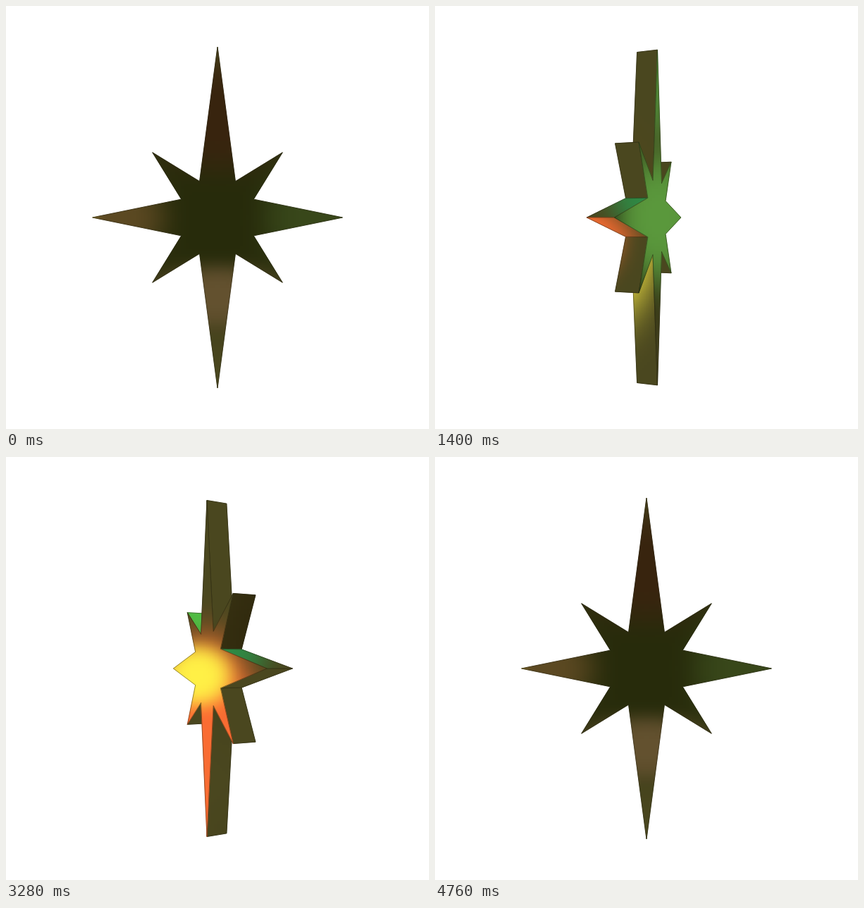
Write an HTML page with a canvas that moves like this. It is 600x600 px and loops after 4800 ms.

```html
<!DOCTYPE html>
<html>
<head>
<meta charset="utf-8">
<title>Turning star</title>
<style>
html, body { margin: 0; width: 100%; height: 100%; overflow: hidden; background: #fff; }
canvas { display: block; width: 100vw; height: 100vh; }
</style>
</head>
<body>
<canvas id="stage" width="600" height="600"></canvas>
<script>
const ctx = document.getElementById('stage').getContext('2d');
const buf = document.createElement('canvas');
const bctx = buf.getContext('2d', { willReadFrequently: true });
const STEP = 40, FRAMES = 120, CAM = 575, CELL = 4;
const FRONT = 14, BACK = -16;

// Half of the outline, clockwise with y up; the other half is its negative.
const half = [[0, 236], [24.8, 50], [90, 90], [50, 25.2], [173, 0], [50, -25.2], [90, -90], [24.8, -50]];
const outline = half.concat(half.map(([x, y]) => [-x, -y]));

const YELLOW = '#fff046', ORANGE = '#fa6c32', OLIVE = '#4a471f';

// Surroundings mirrored by the metal: azimuth, elevation, two radii (degrees), colour.
const lights = [
  [-95, -3, 46, 20, '#191707'],
  [-134, -1, 14, 22, '#141b09'],
  [-75, -46, 22, 16, '#30290d'],
  [0, 0, 20, 13, '#272b0b'],
  [-14, 0, 7, 8, '#38471a'],
  [15, 0, 7, 6, '#5c4922'],
  [0, 14, 9, 7, '#38240e'],
  [0, -11, 9, 4, '#63512f'],
  [46, 10, 14, 15, '#5c4517'],
  [56, 0, 4, 6, '#86661e'],
  [66, -48, 12, 9, '#6a5020'],
  [110, -20, 12, 16, '#7a6030'],
  [36, 1, 11, 6, ORANGE],
  [32, 9, 6, 5, ORANGE],
  [47, -8, 5, 6, '#e85c2e'],
  [50, -24, 6, 14, ORANGE],
  [38, -14, 7, 13, YELLOW],
  [37, -1, 4.5, 4.5, YELLOW],
  [31, -8, 5, 6, YELLOW],
  [22, 0, 4, 5, YELLOW],
  [51, -31, 5, 3, '#ffc038'],
  [61, 52, 10, 6, ORANGE],
  [66, 47, 4, 2, '#d8a030'],
  [129, -12, 11, 7, ORANGE],
  [138, -6, 7, 10, ORANGE],
  [137, -20, 6, 9, ORANGE],
  [128, -17, 4, 7, YELLOW],
  [139, -1, 4.5, 4, YELLOW],
  [110, 19, 6, 3, '#d09a22'],
  [110, -14, 8, 4, ORANGE],
  [113, -29, 12, 5, ORANGE],
  [120, -22, 6, 6, ORANGE],
  [121, 28, 5, 4, ORANGE],
  [121, 21, 6, 4, YELLOW],
  [172, 33, 8, 5, '#48b050'],
  [172, -33, 9, 6, ORANGE],
  [168, -18, 9, 5, ORANGE],
  [-147, 19, 8, 8, '#4f8636'],
  [-150, 0, 6, 9, '#5a983c'],
  [-171, 50, 10, 4, '#50bc44'],
  [-179, 19, 7, 6, '#2f8a45']
].map(([az, el, ra, re, hex]) => ({ az, el, ra, re, rgb: rgb(hex) }));
const base = rgb(OLIVE);

function rgb(hex) {
  const n = parseInt(hex.slice(1), 16);
  return [n >> 16, n >> 8 & 255, n & 255];
}

const dot = (a, b) => a[0] * b[0] + a[1] * b[1] + a[2] * b[2];

function turn([x, y, z], a) {
  const c = Math.cos(a), s = Math.sin(a);
  return [x * c - z * s, y, x * s + z * c];
}

function project([x, y, z]) {
  const k = CAM / (CAM - z);
  return [300 + x * k, 300 - y * k];
}

// Colour of the surroundings in direction r, written to d at index i.
function sky(r, d, i) {
  const deg = 180 / Math.PI;
  const az = Math.atan2(-r[0], r[2]) * deg;
  const el = Math.asin(Math.max(-1, Math.min(1, r[1]))) * deg;
  let [R, G, B] = base;
  for (const l of lights) {
    let da = Math.abs(az - l.az);
    if (da > 180) da = 360 - da;
    const u = da / l.ra, v = (el - l.el) / l.re, q = u * u + v * v;
    if (q > 4) continue;
    const a = Math.exp(-0.7 * q * q);
    R += (l.rgb[0] - R) * a;
    G += (l.rgb[1] - G) * a;
    B += (l.rgb[2] - B) * a;
  }
  d[i] = R; d[i + 1] = G; d[i + 2] = B; d[i + 3] = 255;
}

// Coarse mirror image for one flat face, scaled up smoothly as a fill.
function mirror(pts, n) {
  const xs = pts.map(p => p[0]), ys = pts.map(p => p[1]);
  const x0 = Math.floor(Math.min(...xs)) - 2 * CELL, y0 = Math.floor(Math.min(...ys)) - 2 * CELL;
  const w = Math.ceil((Math.max(...xs) - x0) / CELL) + 2;
  const h = Math.ceil((Math.max(...ys) - y0) / CELL) + 2;
  const img = bctx.createImageData(w, h);
  for (let j = 0; j < h; j++) {
    for (let i = 0; i < w; i++) {
      const x = x0 + (i + 0.5) * CELL - 300, y = 300 - y0 - (j + 0.5) * CELL;
      const m = Math.hypot(x, y, CAM), v = [x / m, y / m, -CAM / m];
      const k = 2 * dot(v, n);
      sky([v[0] - k * n[0], v[1] - k * n[1], v[2] - k * n[2]], img.data, (j * w + i) * 4);
    }
  }
  buf.width = w;
  buf.height = h;
  bctx.putImageData(img, 0, 0);
  const fill = ctx.createPattern(buf, 'repeat');
  fill.setTransform(new DOMMatrix([CELL, 0, 0, CELL, x0, y0]));
  return fill;
}

function makeFaces() {
  const cap = (z, dir) => ({ n: [0, 0, dir], cap: true, pts: outline.map(([x, y]) => [x, y, z]) });
  const walls = outline.map(([x, y], i) => {
    const [u, v] = outline[(i + 1) % outline.length];
    const len = Math.hypot(u - x, v - y);
    return {
      n: [(y - v) / len, (u - x) / len, 0],
      pts: [[x, y, FRONT], [u, v, FRONT], [u, v, BACK], [x, y, BACK]]
    };
  });
  return [...walls, cap(FRONT, 1), cap(BACK, -1)];
}
const faces = makeFaces();

function paint(face) {
  const pts = face.pts.map(project);
  ctx.beginPath();
  pts.forEach(([x, y]) => ctx.lineTo(x, y));
  ctx.closePath();
  ctx.fillStyle = mirror(pts, face.n);
  ctx.fill();
  ctx.strokeStyle = ctx.fillStyle;
  ctx.stroke();
  ctx.strokeStyle = 'rgba(32,30,12,0.5)';
  ctx.stroke();
}

function draw(angle) {
  ctx.fillStyle = '#fff';
  ctx.fillRect(0, 0, 600, 600);
  ctx.lineWidth = 0.9;
  ctx.lineJoin = 'bevel';
  ctx.imageSmoothingEnabled = true;
  faces
    .map(f => ({ n: turn(f.n, angle), cap: f.cap, pts: f.pts.map(p => turn(p, angle)) }))
    .filter(f => {
      const [x, y, z] = f.pts[0];
      return dot(f.n, [-x, -y, CAM - z]) > 0;
    })
    .map(f => ({ ...f, depth: f.cap ? 1e4 : f.pts.reduce((s, p) => s + p[2], 0) / 4 }))
    .sort((a, b) => a.depth - b.depth)
    .forEach(paint);
}

let start = null, shown = -1;
function tick(now) {
  if (start === null) start = now;
  const frame = Math.floor((now - start) / STEP) % FRAMES;
  if (frame !== shown) {
    shown = frame;
    draw(2 * Math.PI * frame / (FRAMES - 1));
  }
  requestAnimationFrame(tick);
}
draw(0);
requestAnimationFrame(tick);
</script>
</body>
</html>
```
